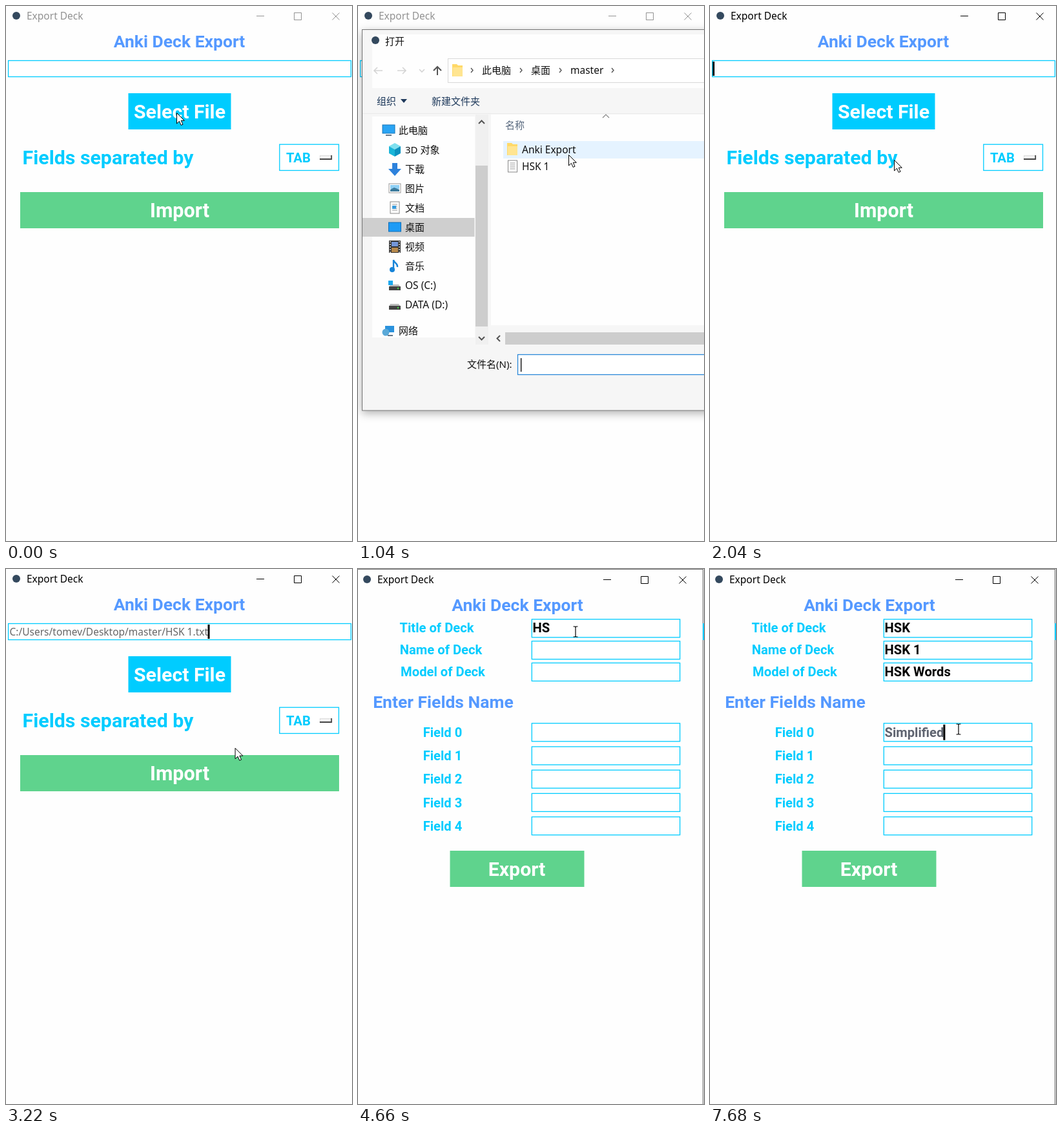
Write an HTML page that moves like this. It is 536 by 828 pixels and loops after 8 s.

```html
<!DOCTYPE html>
<html lang="en">
<head>
<meta charset="utf-8">
<title>Export Deck</title>
<style>
html, body { margin: 0; width: 100%; height: 100%; overflow: hidden; background: #fefefe; }
svg { display: block; width: 100vw; height: 100vh; }
text { white-space: pre; }
.b { font-family: Roboto, sans-serif; font-weight: 700; }
.s { font-family: "Noto Sans", "Noto Sans CJK SC", "Noto Sans CJK", sans-serif; font-size: 15.5px; }
.c { font-family: "Noto Sans", "Noto Sans CJK SC", "Noto Sans CJK", sans-serif; font-size: 15px; }
#dialog { filter: drop-shadow(0 4px 7px rgba(0, 0, 0, .3)); }
</style>
</head>
<body>
<svg id="stage" viewBox="0 0 536 828" xmlns="http://www.w3.org/2000/svg"></svg>
<script>
const CYAN = '#00ccff', BLUE = '#5599ff', GREEN = '#5fd38d';
const LOOP = 8000;

// drawing helpers
const rect = (x, y, w, h, fill, more = '') =>
  `<rect x="${x}" y="${y}" width="${w}" height="${h}" fill="${fill}" ${more}/>`;
const line = (d, color = '#000', w = 1, more = '') =>
  `<path d="${d}" fill="none" stroke="${color}" stroke-width="${w}" ${more}/>`;
const shape = (d, fill) => `<path d="${d}" fill="${fill}"/>`;
const dot = (x, y, r, fill) => `<circle cx="${x}" cy="${y}" r="${r}" fill="${fill}"/>`;
const text = (cls, x, y, str, fill = '#111', more = '') =>
  `<text class="${cls}" x="${x}" y="${y}" fill="${fill}" ${more}>${str}</text>`;
const bold = (x, y, size, str, fill, more = '') =>
  text('b', x, y, str, fill, `font-size="${size}" text-anchor="middle" ${more}`);
const box = (x, y, w, h) => rect(x, y, w, h, '#fff', `stroke="${CYAN}" stroke-width="1.3"`);
const group = (id, body) => `<g id="${id}">${body}</g>`;

// caption offset, then offset of the window buttons
const titleBar = (id, dx, dy, buttons) =>
  `<g transform="translate(${dx} ${dy})">${dot(16, 15, 6, '#34495e')}
  <g id="${id}">
    <text class="s" x="32" y="21">Export Deck</text>
    <path d="M388 15.5h12M446.5 10.5h11v11h-11zM505.5 10.5l11 11m0-11l-11 11" fill="none" stroke="#000"
      transform="translate(${buttons - dx} 0)"/>
  </g></g>`;

const mainWindow = () =>
  rect(0, 0, 536, 828, '#fefefe') + titleBar('bar', 0, 0, 0) +
  bold(268.5, 64, 26.5, 'Anki Deck Export', BLUE) +
  box(3.6, 84.5, 530.8, 25) +
  text('s', 5.5, 102.5, '', '#666', 'id="path"') +
  rect(4, 86, 3, 22, '#000', 'id="pathCaret"') +
  rect(189.5, 135, 159, 56, CYAN) + bold(269, 174, 30.3, 'Select File', '#fff') +
  bold(158, 245, 30.3, 'Fields separated by', CYAN) +
  box(423.8, 214.2, 91.7, 40.3) + bold(453, 241.5, 20.3, 'TAB', CYAN) +
  rect(486, 231, 19, 7, '#f4f4f4') + line('M486 231.5h18M486.5 231v6', '#ddd') +
  line('M486 237h18.2v-6', '#444', 1.8) +
  rect(22, 288, 494, 56, GREEN) + bold(269, 327, 30.5, 'Import', '#fff', 'id="importText"');

const folder = (x, y) =>
  shape(`M${x} ${y}h7l2 2h7v17h-16z`, '#ffd968') + shape(`M${x + 1} ${y + 5}h15v14h-15z`, '#ffe591');
const page = (x, y) =>
  rect(x, y, 14, 18, '#fff', 'stroke="#888"') +
  line(`M${x + 3} ${y + 4}h8m-8 3h8m-8 3h8m-8 3h8`, '#999');
const screen = (x, y) =>
  rect(x, y, 19, 13, '#2aa4f4', 'stroke="#1976b8"') + line(`M${x + 5} ${y + 16}h9`, '#678', 2);
const drive = (x, y) =>
  shape(`M${x + 2} ${y + 7}h13l3 4h-18z`, '#bbb') + rect(x, y + 10, 18, 6, '#444') + dot(x + 14, y + 13, 1.2, '#4d4');

const navItems = [
  ['此电脑', 63, 192, screen(38, 184)],
  ['3D 对象', 73, 222, shape('M48 217l9-5 9 5-9 5z', '#7fe0ef') + shape('M48 217l9 5v11l-9-5z', '#19b5d8') + shape('M66 217l-9 5v11l9-5z', '#0b92c0')],
  ['下载', 73, 252, shape('M53 243h8v9h6l-10 11-10-11h6z', '#2d82dc')],
  ['图片', 73, 282, rect(48, 275, 18, 14, '#fff', 'stroke="#999"') + rect(50, 277, 14, 6, '#8fd0f5') + shape('M50 287v-3l6-3 8 3v3z', '#3b7a9c')],
  ['文档', 73, 312, page(50, 303) + rect(53, 309, 6, 5, '#3a9bdc')],
  ['桌面', 73, 342, rect(47.5, 335, 19, 14, '#1e9bf5', 'stroke="#0b6cb8"')],
  ['视频', 73, 372, rect(48, 363, 18, 19, '#333') + rect(52, 365, 10, 7, '#7396d8') + rect(52, 374, 10, 7, '#b88a4c') + line('M50 364v18M64 364v18', '#ddd', 1.5, 'stroke-dasharray="2 2"')],
  ['音乐', 73, 402, line('M55 408v-15c1 5 7 5 6 11', '#1583d8', 2.4) + dot(53, 408, 4, '#1583d8')],
  ['OS (C:)', 73, 432, drive(48, 424) + rect(47, 425, 7, 7, '#1ca8ee')],
  ['DATA (D:)', 73, 462, drive(48, 454)],
  ['网络', 63, 502, rect(42, 495, 14, 10, '#2a92dd') + dot(43, 505, 5.5, '#5aa9d8') + line('M46 510h8', '#678', 2)]
];
const navLabel = (name, x, y) => text(/^[A-Z]/.test(name) ? 's' : 'c', x, y + 5.5, name);

const dialog = () =>
  rect(6.5, 36.5, 640, 589.5, '#f6f6f6', 'stroke="#777"') +
  rect(22, 44, 620, 83, '#fefefe') + rect(22, 171, 159, 342, '#fefefe') + rect(206, 168, 440, 326, '#fefefe') +
  dot(27, 53, 6, '#34495e') + text('c', 42, 60, '打开') +
  line('M38 100h-13m5-5l-5 5 5 5M61 100h13m-5-5l5 5-5 5M95 98l4 4 4-4', '#d4d4d4', 1.6) +
  line('M123 107v-13m-6 6l6-6 6 6', '#555', 2) +
  rect(139.5, 81.5, 500, 37, '#fff', 'stroke="#d9d9d9"') + folder(146, 90) +
  line('M175 96l3 3.5-3 3.5M251 96l3 3.5-3 3.5M312 96l3 3.5-3 3.5M393 96l3 3.5-3 3.5', '#555', 1.4) +
  text('c', 192, 104.5, '此电脑') + text('c', 268, 104.5, '桌面') + text('s', 329, 104.5, 'master') +
  rect(182, 168, 20, 356, '#f0f0f0') + rect(182, 247, 19, 249, '#cdcdcd') +
  line('M187 182l4.5-4.5 4.5 4.5M187 512l4.5 4.5 4.5-4.5M220 510l-4.5 4.5 4.5 4.5', '#555', 2) +
  rect(228, 505, 400, 19, '#cdcdcd') +
  rect(208, 167, 320, 36, '#d9ebf9', 'id="headHover"') +
  line('M379 173l5-5 5 5', '#888', 1.2) + text('c', 228, 190, '名称', '#56677d') +
  rect(225, 209, 400, 27, '#e5f3ff', 'id="rowHover"') +
  folder(231, 212) + text('s', 254, 228, 'Anki Export') +
  page(232.5, 239) + text('s', 254, 253.5, 'HSK 1') +
  text('c', 169, 560, '文件名(N):') +
  rect(247.5, 539.5, 400, 31, '#fff', 'stroke="#2b88d8" stroke-width="1.3"') + rect(252, 545, 1.3, 21, '#000') +
  group('late',
    text('c', 29, 152.5, '组织', '#1e395b') + shape('M66 144h10l-5 6z', '#1e395b') +
    text('c', 114, 152.5, '新建文件夹', '#1e395b') + line('M7 166.5h530', '#eaeaea') +
    rect(7, 328, 173.5, 29, '#cfcfcf') +
    navItems.map(([name, x, y, icon]) => icon + navLabel(name, x, y)).join(''));

// form rows: label, label centre, baseline, box top
const heads = ['Title', 'Name', 'Model'].map((n, i) =>
  [n + ' of Deck', [122, 128.5, 131.5][i], 98.2 + 33.8 * i, 77.8 + 33.8 * i]);
const fields = [0, 1, 2, 3, 4].map(i => ['Field ' + i, 131, 260 + 36.2 * i, 238.8 + 36.2 * i]);
const rows = [...heads, ...fields];

const form = () =>
  rect(0, 0, 534, 900, '#fefefe') + line('M0 .5h534.5v900', '#777', 1.2) + titleBar('formBar', -2, 1, -8) +
  rect(534, 84, 2, 26, CYAN) +
  bold(247, 65, 26.5, 'Anki Deck Export', BLUE) +
  bold(132, 215, 26.5, 'Enter Fields Name', BLUE) +
  rows.map(([name, x, y, top], i) =>
    bold(x, y, 20.2, name, CYAN) + box(269.3, top, 229.4, 28) +
    text('b', 270.5, y, '', i > 2 ? '#5f6470' : '#000', `font-size="20.2" id="entry${i}"`)).join('') +
  rect(0, 0, 3, 24, '#000', 'id="formCaret"') +
  rect(142.5, 436, 208, 56, GREEN) + bold(246, 475, 30.3, 'Export', '#fff');

const stage = document.getElementById('stage');
stage.innerHTML = group('main', mainWindow()) + group('dialog', dialog()) + group('form', form()) +
  '<path id="arrow" d="M.5 .5v16.5l4-3.7 2.7 6.2 2.8-1.2-2.7-6h5z" fill="#fff" stroke="#000"/>' +
  '<path id="beam" d="M-3.5-8h2.5l1 1 1-1h2.5M0-7v14M-3.5 8h2.5l1-1 1 1h2.5" fill="none" stroke="#000" stroke-width="1.2"/>';
const el = id => document.getElementById(id);
const set = (id, attrs) => { for (const k in attrs) el(id).setAttribute(k, attrs[k]); };
const show = (id, on) => { el(id).style.display = on ? '' : 'none'; };

// timeline: time, x, y
const pointer = [
  [0, 264, 165], [150, 264, 165], [320, 264, 167], [840, 264, 167], [1040, 326, 230], [1340, 285, 238],
  [2450, 285, 238], [2820, 451, 235], [2980, 451, 235], [3440, 271, 313], [LOOP, 271, 313]
];
const beam = [[4270, 337, 97], [5370, 337, 128], [5830, 329, 163], [7350, 385, 248]];
// typing: time, row, content
const typing = [
  [4270, 0, ''], [4430, 0, 'HS'], [5280, 0, 'HSK'], [5370, 1, 'HSK'], [5680, 1, 'HSK '],
  [5830, 1, 'HSK 1'], [5830, 2, 'HSK'], [6470, 2, 'HSK '], [6780, 2, 'HSK W'], [7110, 2, 'HSK Wo'],
  [7260, 2, 'HSK Words'], [7350, 3, 'S'], [7430, 3, 'Simp'], [7520, 3, 'Simplifie'], [7680, 3, 'Simplified']
];
const caretOff = [[2830, 3100], [3670, 4060], [4660, 4970], [6380, 6470]];

const clamp = v => Math.max(0, Math.min(1, v));
const within = (t, a, b) => t >= a && t < b;
const last = (list, t) => list.filter(k => k[0] <= t).pop();

function pointerAt(t) {
  const i = Math.max(1, pointer.findIndex(k => k[0] > t));
  const [t0, x0, y0] = pointer[i - 1], [t1, x1, y1] = pointer[i];
  const p = (t - t0) / (t1 - t0), e = p * p * (3 - 2 * p);
  return [x0 + (x1 - x0) * e, y0 + (y1 - y0) * e];
}

// windows fade while growing from 95 %
function popup(id, p, cx, cy, dx = 0, dy = 0) {
  const s = .95 + .05 * p;
  show(id, p > 0);
  set(id, { opacity: p, transform: `translate(${dx + cx * (1 - s)} ${dy + cy * (1 - s)}) scale(${s})` });
}

function drawForm(t) {
  const done = t >= 4270;
  if (done) popup('form', 1, 0, 0);
  else popup('form', t < 4060 ? 0 : clamp((t - 4030) / 200), 267, 400, -220, 113);
  const content = rows.map(() => '');
  let active = 0;
  for (const [at, row, str] of typing) if (at <= t) { content[row] = str; active = row; }
  content.forEach((str, i) => { el('entry' + i).textContent = str; });
  const width = content[active] ? el('entry' + active).getComputedTextLength() : 0;
  set('formCaret', { x: 269.5 + width, y: rows[active][3] + 2 });
}

function draw(t) {
  const blinkOn = !caretOff.some(([a, b]) => within(t, a, b));
  const focused = within(t, 150, 320) || t >= 1950;
  set('bar', { opacity: focused ? 1 : .42 });

  el('path').textContent = t >= 2300 ? 'C:/Users/tomev/Desktop/master/HSK 1.txt' : '';
  set('pathCaret', { x: t >= 2300 ? 5 + el('path').getComputedTextLength() : 4 });
  show('pathCaret', focused && blinkOn);
  const push = within(t, 3840, 3910) ? 1 : 0;
  set('importText', { transform: `translate(${push} ${push})` });

  const [x, y] = pointerAt(t);
  const open = t < 550 ? 0 : t < 1650 ? clamp((t - 500) / 320) : clamp(1 - (t - 1600) / 400);
  popup('dialog', open, 359, 212);
  show('late', t >= 870);
  show('headHover', t < 870);
  show('rowHover', y > 209);
  set('rowHover', { y: y < 236 ? 209 : 236 });

  drawForm(t);
  show('formCaret', blinkOn && t >= 4270);
  show('arrow', t < 4270);
  show('beam', t >= 4270);
  set('arrow', { transform: `translate(${x} ${y})` });
  const b = last(beam, t);
  if (b) set('beam', { transform: `translate(${b[1]} ${b[2]})` });
}

const start = performance.now();
function tick() {
  draw((performance.now() - start) % LOOP);
  requestAnimationFrame(tick);
}
tick();
</script>
</body>
</html>
```
